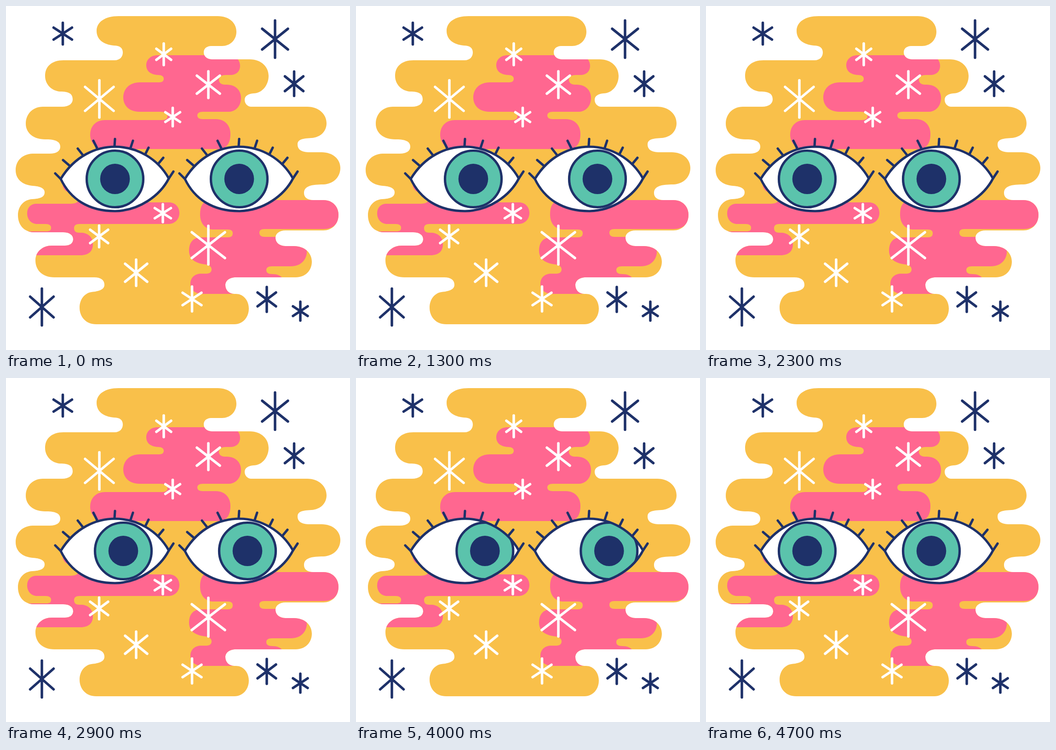
An HTML page that plays this animation: 748x748 px, repeating every 4800 ms.

```html
<!DOCTYPE html>
<html lang="en">
<head>
<meta charset="utf-8">
<title>Looking eyes</title>
<style>
html, body { margin: 0; width: 100%; height: 100%; overflow: hidden; background: #fff; }
svg { display: block; width: 100%; height: 100%; }
.line { fill: none; stroke: #1e3169; stroke-width: 5.2; stroke-linecap: round; stroke-linejoin: round; }
.star { fill: none; stroke-width: 5.5; stroke-linecap: round; }
</style>
</head>
<body>
<svg viewBox="0 0 748 748">
  <defs>
    <path id="cloud" d="M245 22H460C486 22 501 37 501 56C501 75 486 87 470 87H445
      C434 88 430 94 430 101C430 110 438 116 448 116H530C556 116 571 133 571 152
      C571 173 556 190 538 190C526 191 519 196 519 204C519 212 525 219 533 219H655
      C681 219 697 236 697 255C697 273 683 286 664 287C645 288 634 290 634 301
      C634 313 644 318 660 318H686C711 318 727 333 727 352C727 372 712 387 690 388
      C665 388 648 391 648 407C648 417 657 422 668 422H690C711 422 723 437 723 454
      C723 475 708 488 690 488H608C594 488 586 495 586 504C586 515 595 522 608 522H625
      C650 522 665 537 665 556C665 576 650 590 630 590H500C486 590 477 597 477 607
      C477 618 485 626 497 626H500C517 626 528 641 528 658C528 677 515 692 497 692H196
      C174 692 160 676 160 656C160 638 171 624 186 622C204 620 214 616 214 606
      C214 596 206 590 192 590H105C80 590 64 575 64 553C64 534 80 521 100 521H128
      C139 521 146 516 146 507C146 498 138 492 124 492H60C38 491 26 475 26 455
      C26 435 39 421 57 420C75 419 84 415 84 405C84 396 74 392 58 391
      C36 389 21 377 21 357C21 337 35 322 58 321H95C110 321 118 315 118 306
      C118 296 110 291 92 290H85C60 290 43 276 43 256C43 234 59 219 80 219H122
      C137 219 145 212 145 203C145 191 137 186 118 186C100 185 85 171 85 152
      C85 131 100 118 125 118H236C248 118 254 110 254 101C254 91 247 86 235 86
      C212 84 197 73 197 54C197 35 215 22 245 22Z"/>
    <path id="lid" d="M119 376C150 325 197 306 237 306C285 306 330 332 354 375
      C335 412 290 445 237 446C180 446 140 420 119 376Z"/>
    <clipPath id="inCloud"><use href="#cloud"/></clipPath>
    <clipPath id="inLid"><use href="#lid"/></clipPath>
    <g id="eye">
      <use href="#lid" fill="#fff"/>
      <g clip-path="url(#inLid)">
        <g id="iris">
          <circle class="line" cx="237" cy="376" r="61.5" style="fill:#5bc3ac"/>
          <ellipse cx="237" cy="376" rx="32.3" ry="33" fill="#1e3169"/>
        </g>
      </g>
      <use href="#lid" class="line"/>
      <path class="line" d="M107 364L119 376M124 335L138 347M156 310L167 324M190 293L198 309
        M237 289L236 304M276 293L271 308M310 308L303 322M342 330L332 342M364 360L354 375"/>
    </g>
  </defs>

  <rect width="748" height="748" fill="#fff"/>
  <use href="#cloud" fill="#f9c04a"/>
  <g fill="#ff6790" clip-path="url(#inCloud)">
    <path d="M330 107H480C498 107 509 116 509 130C509 143 500 150 488 150H478
      C468 150 463 154 463 160C463 167 468 171 476 171H480C499 171 511 183 511 200
      C511 218 499 230 484 230H428C420 230 416 233 416 238C416 243 420 246 428 246H457
      C475 246 488 259 488 278C488 296 482 311 460 311H214C195 311 183 297 183 280
      C183 261 196 248 215 248H340C347 248 351 245 351 240C351 233 346 230 336 230H290
      C268 230 255 216 255 199C255 181 268 166 291 166H333C340 166 343 163 343 158
      C343 153 339 150 330 150C314 149 305 141 305 129C305 116 315 107 330 107Z"/>
    <path d="M66 430H140C158 430 165 420 150 410L140 406C130 404 123 398 123 386L200 380
      L300 427H354C368 427 377 437 377 450C377 464 367 474 353 474H160
      C152 474 148 477 148 483C148 490 152 493 160 493H165C180 494 189 504 189 518
      C189 533 180 542 162 542H40V490H88C95 490 98 488 98 482C98 477 94 474 86 474H68
      C55 474 46 464 46 451C46 438 54 430 66 430Z"/>
    <path d="M440 422H700C720 422 724 437 724 454C724 472 712 485 690 485H562
      C554 485 551 488 551 493C551 499 555 502 563 502H600V520H652C660 546 645 566 620 566H578
      C570 566 566 569 566 574C566 580 570 583 580 583C590 583 596 586 602 592H510V626H428
      C411 626 401 617 401 604C401 590 411 582 425 582H436C443 582 447 578 447 573
      C447 567 443 564 435 562C410 560 398 549 398 532C398 513 408 503 425 503H482
      C490 503 493 500 493 494C493 489 490 486 482 486H448C431 484 422 471 422 453
      C422 435 428 426 440 422Z"/>
  </g>
  <path id="navyStars" class="star" stroke="#1e3169"/>
  <path id="whiteStars" class="star" stroke="#fff"/>
  <use href="#eye"/>
  <use href="#eye" x="270"/>
</svg>
<script>
// Each star: centre x, centre y, half height, diagonal half width, diagonal half height
const navy = [
  [123.5, 60, 23.5, 20, 13], [585, 72, 40.5, 28, 22.5], [626.5, 169, 26.5, 20, 16],
  [78, 654.5, 40, 25.5, 22.5], [567, 638, 27, 20, 15], [640, 663.5, 20.5, 16, 10.5]
];
const white = [
  [343, 105, 23.5, 16, 12], [203, 202, 40.5, 31, 26], [440, 171, 29, 25, 19.5],
  [362.5, 241.5, 20, 16, 10.5], [341, 450.5, 19.5, 17.5, 11], [202.5, 501, 23.5, 19.5, 14.5],
  [283, 580, 28.5, 24, 19.5], [404.5, 637, 27, 20.5, 13.5], [440, 520, 42, 36, 28]
];

const starPath = ([x, y, h, dx, dy]) =>
  `M${x} ${y - h}v${2 * h}M${x - dx} ${y - dy}l${2 * dx} ${2 * dy}M${x - dx} ${y + dy}l${2 * dx} ${-2 * dy}`;
const drawStars = (id, stars) =>
  document.getElementById(id).setAttribute('d', stars.map(starPath).join(''));
drawStars('navyStars', navy);
drawStars('whiteStars', white);

// Gaze offsets, one held pose per step
const STEP = 100;
const gaze = [0, 18, 43.3, 60.5, 43.3, 18, 0, -17, -43, -60.5, -43, -17];
const iris = document.getElementById('iris');
const start = performance.now();

function frame(now) {
  const step = Math.floor(Math.max(0, now - start) / STEP) % gaze.length;
  iris.setAttribute('transform', `translate(${gaze[step]} 0)`);
  requestAnimationFrame(frame);
}
frame(start);
</script>
</body>
</html>
```
